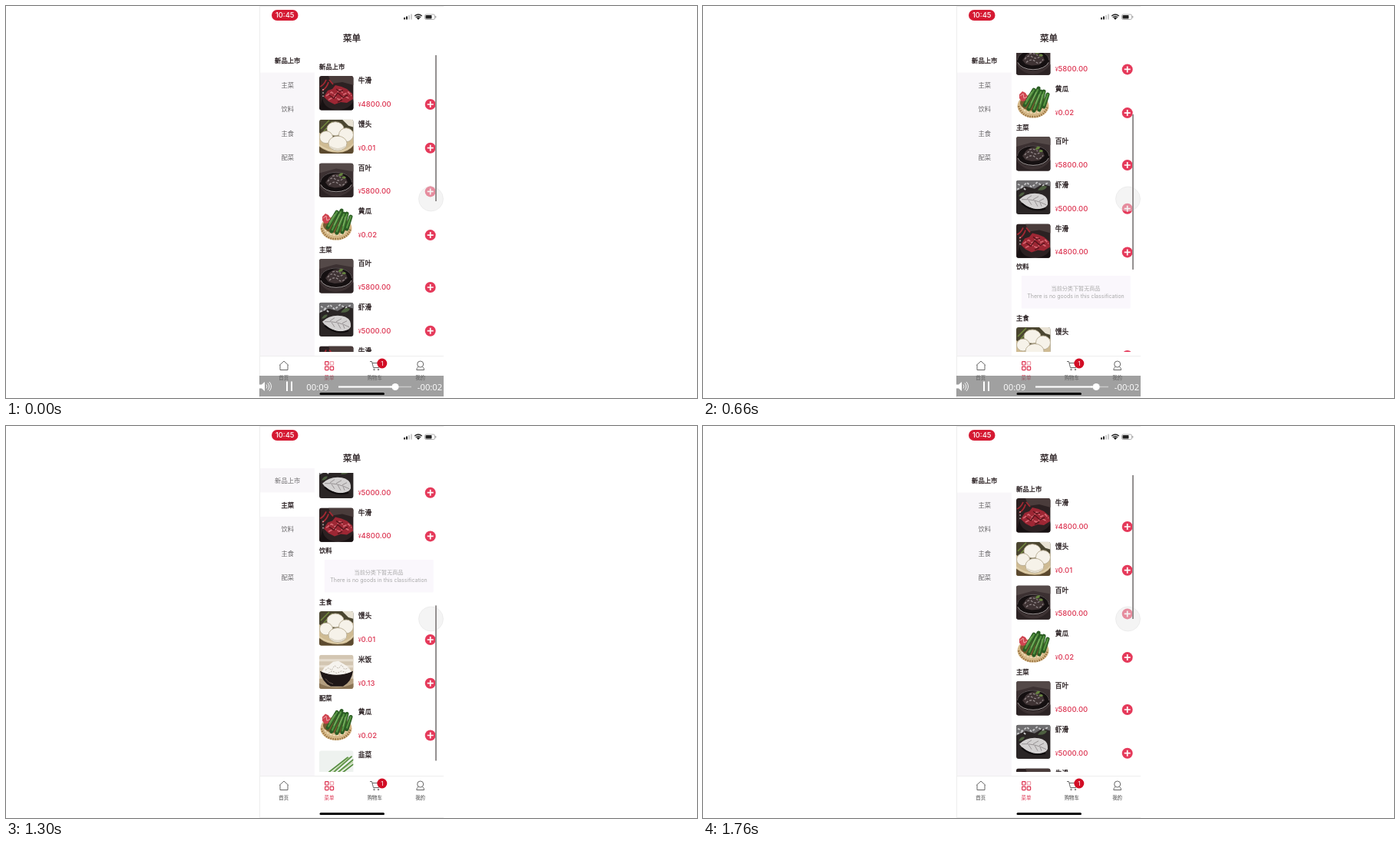
An HTML page that plays this animation: 900x510 px, repeating every 1860 ms.

```html
<!DOCTYPE html>
<html lang="zh-CN">
<head>
<meta charset="utf-8">
<title>菜单</title>
<style>
html, body { margin: 0; width: 100%; height: 100%; overflow: hidden; background: #fff; }
svg { display: block; width: 900px; height: 510px; }
text { font-family: Inter, "Noto Sans CJK SC", "Noto Sans CJK", sans-serif; }
.strong { font-weight: 500; stroke-width: .32px; }
.price { font-weight: 500; }
.player { font-family: "Open Sans", "Noto Sans", sans-serif; }
</style>
</head>
<body>
<svg id="stage" viewBox="0 0 900 510" xmlns="http://www.w3.org/2000/svg">
  <defs>
    <clipPath id="phone"><rect x="330" width="240" height="510"/></clipPath>
    <clipPath id="view"><rect x="402" y="61.5" width="168" height="388"/></clipPath>
    <clipPath id="round"><rect width="44.4" height="44.4" rx="3"/></clipPath>

    <g id="beef">
      <rect width="45" height="45" fill="#2c2122"/>
      <path d="M12 0H45V12L30 8 16 10Z" fill="#4a3c3b"/>
      <path d="M4 28Q6 44 25 44 42 43 45 30V45H0Z" fill="#171112"/>
      <path d="M6 27L11 19 17 17 21 12 29 14 36 17 43 23 44 30 36 35 28 34 20 37 12 33Z" fill="#9d2734"/>
      <path d="M9 26l7-5 5 4 6-8 5 7 6-3 4 5M12 31l8-4 6 4 7-5 7 4" fill="none" stroke="#d86a74" stroke-width="1.600" stroke-dasharray="5 1.500"/>
      <path d="M13 25l6 4 5-7 7 6 6-3M22 17l4 3 5-1M24 34l6-3" fill="none" stroke="#5a141c" stroke-width="1.400"/>
      <path d="M1 14q5-2 8-9M4 19q6-4 8-11M13 5l5 6" fill="none" stroke="#a32832" stroke-width="1.800"/>
      <path d="M5 17v11" stroke="#c9c0c0" stroke-width="1.400" stroke-dasharray="1.600 2.600"/>
    </g>

    <g id="bun">
      <rect width="45" height="45" fill="#4a4530"/>
      <path d="M2 12L13 1M6 15L17 3" stroke="#71883d" stroke-width="1.600"/>
      <path d="M30 0H45V10L38 8Z" fill="#e8e2d4"/>
      <path d="M0 17Q20 34 45 14V45H0Z" fill="#cfbb93"/>
      <path d="M0 35Q10 43 24 43T45 33V45H0Z" fill="#5c4a2f"/>
      <path d="M0 33Q10 41 24 41T45 31" fill="none" stroke="#e0d0ac" stroke-width="1.500"/>
      <g fill="#f6f2e9" stroke="#b7ac92" stroke-width=".9">
        <ellipse cx="21" cy="12" rx="11" ry="9"/><ellipse cx="9" cy="23" rx="8.500" ry="8"/>
        <ellipse cx="35" cy="20" rx="9.500" ry="9"/><ellipse cx="24" cy="31" rx="12" ry="9.500"/>
      </g>
      <path d="M14 35q10 7 20 0" fill="none" stroke="#dfd8c8" stroke-width="2"/>
    </g>

    <g id="tripe">
      <rect width="45" height="45" fill="#3c3132"/>
      <path d="M0 0H45V11L22 7 0 13Z" fill="#544948"/>
      <path d="M0 30Q8 43 22 43T45 30V45H0Z" fill="#2c2324"/>
      <ellipse cx="22" cy="25" rx="21" ry="13.500" fill="#151011"/>
      <path d="M1.500 25a20.500 13 0 0 1 41 0" fill="none" stroke="#6f6566" stroke-width=".8"/>
      <path d="M2 28a20.500 12 0 0 0 40 0" fill="none" stroke="#a39b9b" stroke-width="1"/>
      <path d="M8 25L13 18 19 14 27 13 34 18 37 25 30 31 20 32 12 30Z" fill="#3f3334"/>
      <path d="M11 24q5-7 10-3t12-2M13 28q7-6 12-1t10-3M17 17q6-2 11 2" fill="none" stroke="#8f8586" stroke-width="1.300" stroke-dasharray="3 1.800"/>
      <path d="M25 17q1-5 6-4 0 4-6 4M29 19q4-4 6 0-3 2-6 0" fill="#66853f"/>
    </g>

    <g id="cucumber">
      <rect width="45" height="45" fill="#fff"/>
      <ellipse cx="22" cy="28" rx="20.500" ry="15.500" fill="#d5b888"/>
      <path d="M3 28Q7 42 22 42T41 28" fill="none" stroke="#98713f" stroke-width="2.500" stroke-dasharray="1.500 1.500"/>
      <path d="M6 25Q8 37 22 37T38 25" fill="none" stroke="#f0dfbd" stroke-width="1.500" stroke-dasharray="3 1.500"/>
      <ellipse cx="22" cy="24" rx="17" ry="10" fill="#77592f"/>
      <path d="M4 13l4-4 4 2 3 5-2 5-6 1-3-4z" fill="#cf4450"/>
      <path d="M5 15l4-3 1 6 4-2" fill="none" stroke="#f3b4b4" stroke-width=".9"/>
      <g fill="none" stroke-linecap="round">
        <path d="M11 27L23 7M16 32L29 5M23 34L32 9M30 33L36 9M36 29L41 13" stroke="#2b5d24" stroke-width="5"/>
        <path d="M12 25L23 7M17 30L28 7M23 32L32 10M30 31L36 10M36 27L41 13" stroke="#579542" stroke-width="2.200"/>
        <path d="M13 21L20 10M19 24L26 10M25 25L30 13M31 25L34 13" stroke="#a2c982" stroke-width=".7"/>
      </g>
    </g>

    <g id="shrimp">
      <rect width="45" height="45" fill="#2a2525"/>
      <path d="M0 0H45V8L34 5 24 11 12 8 0 14Z" fill="#6f6e70"/>
      <path d="M2 5l6 3 6-5 6 6 7-6 7 4 8-4M1 12l7-3 5 4" fill="none" stroke="#c9c9cb" stroke-width="1.800" stroke-dasharray="3 2"/>
      <path d="M28 13q5-8 12-5-2 6-12 5M3 21q3-6 8-5-2 5-8 5" fill="#4e6041"/>
      <path d="M4 25Q12 17 24 17 36 17 40 24 43 32 38 35 28 40 17 35 8 31 4 25Z" fill="#d3d1d1"/>
      <path d="M7 25Q24 24 39 32M14 24l6-4M22 25l7-4M30 27l6-3M16 26l4 6M24 27l4 7M31 29l2 5" fill="none" stroke="#908c8d" stroke-width=".9"/>
      <path d="M7 30Q20 42 38 37" fill="none" stroke="#0f0c0d" stroke-width="2"/>
    </g>

    <g id="rice">
      <rect width="45" height="45" fill="#d3c6b2"/>
      <path d="M0 7H45M0 15H45" stroke="#e6ddcf" stroke-width="3"/>
      <path d="M0 31H45V45H0Z" fill="#b49f80"/>
      <path d="M0 37Q22 48 45 37V45H0Z" fill="#8b7455"/>
      <path d="M1 21Q22 30 44 21 42 35 31 41H15Q4 36 1 21Z" fill="#1f1717"/>
      <path d="M8 31q4 6 10 7" fill="none" stroke="#66574f" stroke-width="1"/>
      <path d="M3 22L7 16 13 13 18 9 25 8 32 12 38 16 42 22Q22 30 3 22Z" fill="#f6f3ee"/>
      <path d="M8 20l4-3 4 3 4-6 5 4 4-5 4 6 5-2M12 24l5-3 6 3 6-3 6 2" fill="none" stroke="#bcb5aa" stroke-width="1" stroke-dasharray="2 1.500"/>
    </g>

    <g id="chives">
      <rect width="45" height="45" fill="#eef2ef"/>
      <g fill="none" stroke-linecap="round">
        <path d="M8 38L42 8M5 34L37 9M13 38L44 12M17 39L44 18" stroke="#5b9145" stroke-width="1.800"/>
        <path d="M9 35L39 9M15 36L44 15" stroke="#9dc274" stroke-width=".9"/>
      </g>
    </g>
  </defs>

  <g clip-path="url(#phone)">
    <path d="M330.500 0V510M330 .5H570M330 509.500H570" stroke="#eee"/>
    <rect x="346" y="5" width="34.500" height="14" rx="7" fill="#d51932"/>
    <g fill="#222">
      <path d="M518 15h2v2.500h-2zM521 13.500h2v4h-2z"/>
      <path d="M524 12h2v5.500h-2zM527 10.500h2v7h-2z" fill="#ccc"/>
      <path d="M534.700 15.500L537 18l2.300-2.500Q537 13.500 534.700 15.500Z"/>
      <path d="M532.200 13Q537 9 541.800 13M533.700 14.700Q537 12 540.300 14.700" fill="none" stroke="#222" stroke-width="1.300"/>
      <rect x="545.500" y="11" width="13" height="6.500" rx="1.800" fill="none" stroke="#999" stroke-width=".8"/>
      <rect x="546.500" y="12" width="8" height="4.500" rx=".8"/>
      <path d="M559.300 13v2.500h1v-2.500z" fill="#999"/>
    </g>
    <rect x="331" y="55" width="70.800" height="400" fill="#f8f6f9"/>
    <g id="sideA"></g>
    <g id="sideB"></g>
    <g clip-path="url(#view)"><g id="list"></g></g>
    <circle cx="553.500" cy="251" r="16" fill="#e9e9e9" fill-opacity=".48" stroke="#ddd" stroke-opacity=".6" stroke-width=".7"/>
    <rect id="bar" x="559" width="2" height="1" fill="#949090"/>

    <path d="M331 455.500H570" stroke="#eee"/>
    <g fill="none" stroke="#666">
      <path d="M356 467.500L362 462l6 5.500M357 467V473.500h10V467"/>
      <g stroke="#dc3350" stroke-width="1.200">
        <rect x="415.600" y="462.600" width="4.400" height="4.400" rx=".8"/>
        <rect x="422.200" y="462.600" width="4.400" height="4.400" rx=".8" stroke="#efa0ac"/>
        <rect x="415.600" y="469.200" width="4.400" height="4.400" rx=".8"/>
        <rect x="422.200" y="469.200" width="4.400" height="4.400" rx=".8"/>
      </g>
      <path d="M474 462.500h2.500l2 8h7l1.500-6H477"/>
      <circle cx="479.500" cy="473" r=".8"/><circle cx="485" cy="473" r=".8"/>
      <circle cx="539.700" cy="466" r="4"/>
      <path d="M537 469.500q-2.500 1.500-2.200 4h9.800q.3-2.500-2.200-4"/>
    </g>
    <circle cx="489.800" cy="465" r="6.500" fill="#d20d25"/>
    <g id="labels"></g>

    <g id="player">
      <rect x="330" y="481" width="240" height="27" fill="#6e6e6e" fill-opacity=".65"/>
      <path d="M330 492.500h3l4-3.500v12l-4-3.500h-3z" fill="#fff"/>
      <path d="M339 492.500q2 2.500 0 5M341 490.500q3.500 4.500 0 9M343 489q5 6 0 12" fill="none" stroke="#fff" stroke-width=".9"/>
      <path d="M366 488.500V501M372 488.500V501" stroke="#fff" stroke-width="2"/>
      <path d="M433 495.500H528" stroke="#c9c9c9" stroke-width="1.500"/>
      <path d="M433 495.500H507" stroke="#fff" stroke-width="1.800"/>
      <g id="knob"><path d="M500 495.500H507" stroke="#fff" stroke-width="1.800"/><circle cx="507" cy="495.500" r="4.600" fill="#fff"/></g>
      <text class="player" x="391.300" y="499.700" font-size="11.300" fill="#fff">00:09</text>
      <text class="player" x="535.800" y="499.700" font-size="11.300" fill="#fff">-00:02</text>
    </g>
    <rect x="408.500" y="503" width="84.500" height="3" rx="1.500" fill="#050505"/>
  </g>
</svg>
<script>
const LOOP = 1860;
// time in ms, y of the first list heading
const STEPS = [
  [0, 79], [100, 75], [180, 72], [280, 69], [380, 46], [460, 12], [560, -34],
  [660, -80], [740, -112], [840, -151], [940, -185], [1020, -208], [1120, -240],
  [1200, -259], [1300, -257], [1400, -210], [1480, -161], [1580, -68], [1660, 14], [1760, 82]
];
const REST = 67, BAR_TOP = 64, BAR_LENGTH = 202, BAR_RATIO = .523, SECOND_SECTION = 238;
const PITCH = 56.7;
const INK = '#2b2123', RED = '#dc3350';
const $ = id => document.getElementById(id);

// y is the middle of the glyphs
function label(str, x, y, size, fill, { anchor = 'start', look = '' } = {}) {
  const stroke = look === 'strong' ? fill : 'none';
  return `<text x="${x}" y="${y + size * .37}" font-size="${size}" fill="${fill}" stroke="${stroke}" text-anchor="${anchor}" class="${look}">${str}</text>`;
}
const centred = { anchor: 'middle' };
const bold = { look: 'strong' };
const boldCentred = { ...centred, ...bold };

const DISHES = {
  beef: ['牛滑', '4800.00'], bun: ['馒头', '0.01'], tripe: ['百叶', '5800.00'],
  cucumber: ['黄瓜', '0.02'], shrimp: ['虾滑', '5000.00'], rice: ['米饭', '0.13'], chives: ['韭菜', '0.02']
};
const SECTIONS = [
  ['新品上市', 0, ['beef', 'bun', 'tripe', 'cucumber']],
  ['主菜', 238, ['tripe', 'shrimp', 'beef']],
  ['饮料', 419, []],
  ['主食', 486, ['bun', 'rice']],
  ['配菜', 610.5, ['cucumber', 'chives']]
];

function dish(kind, y) {
  const [name, price] = DISHES[kind];
  return `<g transform="translate(408 ${y})"><use href="#${kind}" clip-path="url(#round)"/></g>`
    + label(name, 458.7, y + 6, 8.7, INK, bold)
    + label(`<tspan font-size="7" font-weight="400">¥</tspan>${price}`, 458.7, y + 36.5, 9.5, RED, { look: 'price' })
    + `<circle cx="552.700" cy="${y + 37}" r="7" fill="#e5395a"/>`
    + `<path d="M548.700 ${y + 37}h8m-4-4v8" stroke="#fff" stroke-width="1.700"/>`;
}

function emptyBox(y) {
  return `<rect x="414.700" y="${y}" width="142" height="42.500" rx="1" fill="#faf7fc"/>`
    + label('当前分类下暂无商品', 485.5, y + 16.5, 7.1, '#aaa', centred)
    + label('There is no goods in this classification', 485.5, y + 26, 7, '#aaa', centred);
}

$('list').innerHTML = SECTIONS.map(([title, y, kinds]) =>
  label(title, 408, y, 8.3, INK, bold)
  + (kinds.length ? kinds.map((kind, i) => dish(kind, y + 12 + i * PITCH)).join('') : emptyBox(y + 12))
).join('');

function sidebar(active) {
  return `<rect x="331" y="${55 + 31.5 * active}" width="71" height="31.500" fill="#fff"/>`
    + SECTIONS.map(([title], i) => label(title, 366.7, 71 + 31.5 * i, 8.3,
      i === active ? INK : '#6b696b', i === active ? boldCentred : centred)).join('');
}
$('sideA').innerHTML = sidebar(0);
$('sideB').innerHTML = sidebar(1);

$('labels').innerHTML =
  ['首页', '菜单', '购物车', '我的'].map((s, i) =>
    label(s, 361.7 + 59.3 * i, 484, 6.4, i === 1 ? RED : '#444', centred)).join('')
  + label('1', 489.8, 465, 8, '#fff', centred)
  + label('10:45', 363.2, 12, 9.3, '#fff', { ...centred, look: 'price' })
  + label('菜单', 450.5, 41.5, 11.5, INK, boldCentred);

// holds each value until the next step
function play(id, pose) {
  const frames = STEPS.map(([t, y]) => ({ ...pose(y, t), offset: t / LOOP, easing: 'step-end' }));
  frames.push({ ...frames[frames.length - 1], offset: 1 });
  $(id).animate(frames, { duration: LOOP, iterations: Infinity });
}

play('list', y => ({ transform: `translate(0px, ${y}px)` }));
play('bar', y => {
  const scroll = REST - y;
  const top = BAR_TOP + Math.max(0, scroll) * BAR_RATIO;
  return { transform: `translate(0px, ${top}px) scale(1, ${BAR_LENGTH + Math.min(0, scroll)})` };
});
const inSecond = y => REST - y >= SECOND_SECTION;
play('sideA', y => ({ opacity: inSecond(y) ? 0 : 1 }));
play('sideB', y => ({ opacity: inSecond(y) ? 1 : 0 }));
play('knob', (y, t) => ({ transform: `translate(${t * .0077}px, 0px)` }));
play('player', (y, t) => ({ opacity: Math.min(1, Math.max(0, (1020 - t) / 270)) }));
</script>
</body>
</html>
```
